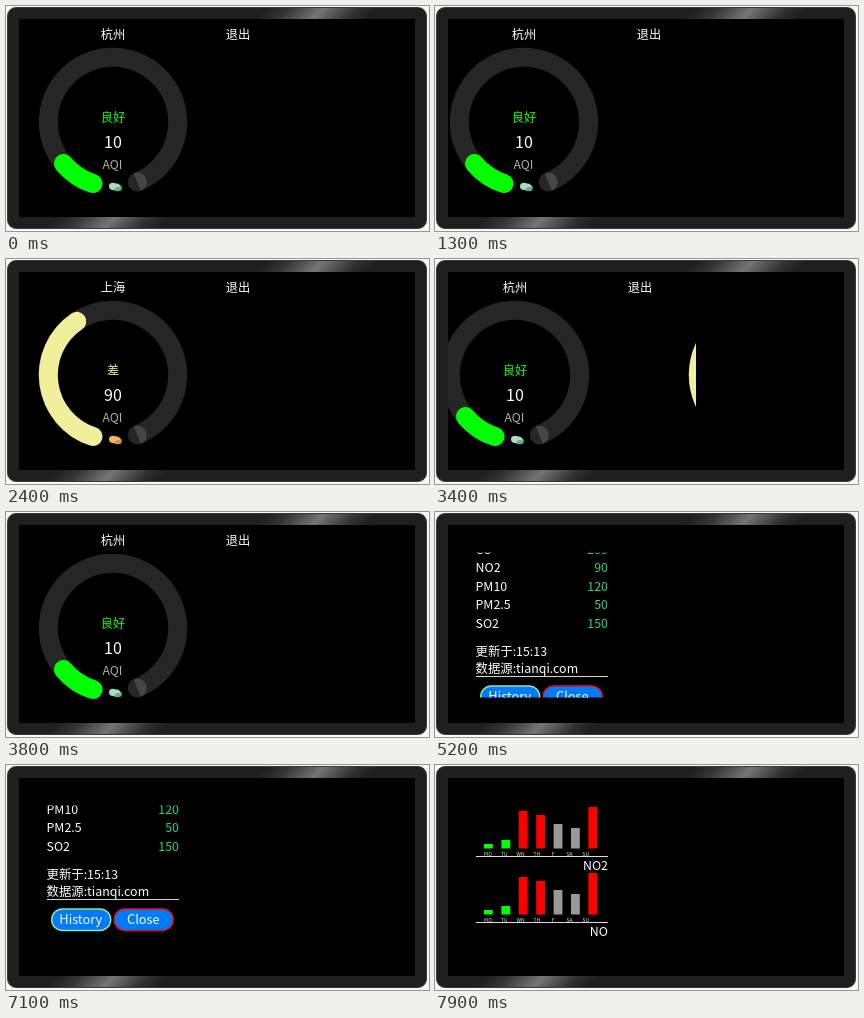
Recreate the animation shown at these times as an HTML page. Size 423 by 225 pixels, loop 8000 ms.

```html
<!DOCTYPE html>
<html lang="zh-CN">
<head>
<meta charset="utf-8">
<title>AQI</title>
<style>
html, body { margin: 0; width: 100%; height: 100%; overflow: hidden; background: #f8f8f8; }
.case {
  position: absolute; left: 1px; top: 1px; width: 418px; height: 220px;
  border: 1px solid #3a3a3a; border-radius: 9px;
  background: linear-gradient(135deg, #1f1f1f 40.5%, #343434 44%, #747474 49.5%, #303030 55%, #1f1f1f 58%);
}
svg { position: absolute; left: 0; top: 0; }
text { font-family: "Noto Sans CJK SC", "Noto Sans", sans-serif; font-size: 12.4px; fill: #fff; }
</style>
</head>
<body>
<div class="case"></div>
<svg id="stage" width="423" height="225" viewBox="0 0 423 225">
  <defs>
    <clipPath id="pageClip"><rect x="13" y="13" width="248" height="198"/></clipPath>
    <clipPath id="listClip"><rect x="40" y="40.5" width="134" height="145"/></clipPath>
  </defs>
  <rect x="13" y="13" width="396" height="198" fill="#000"/>
  <g id="pages" clip-path="url(#pageClip)"></g>
  <g id="panel" clip-path="url(#listClip)"><g id="list"></g></g>
  <g id="charts"></g>
</svg>
<script>
const LOOP = 8000, STEP = 100, PAGE = 248;
const CX = 107, CY = 116, R = 64.7, START = 18, SWEEP = 320;
const $ = id => document.getElementById(id);

function add(parent, tag, attrs, text) {
  const el = document.createElementNS('http://www.w3.org/2000/svg', tag);
  for (const k in attrs) el.setAttribute(k, attrs[k]);
  if (text !== undefined) el.textContent = text;
  parent.appendChild(el);
  return el;
}
// y is the visual middle of the line
function label(parent, str, x, y, { size = 12.4, fill = '#fff', anchor = 'start' } = {}) {
  return add(parent, 'text', {
    x, y: y + size * 0.365, 'text-anchor': anchor, style: `font-size:${size}px;fill:${fill}`
  }, str);
}
const mid = (parent, str, x, y, size, fill) => label(parent, str, x, y, { size, fill, anchor: 'middle' });

// Angles run clockwise from the bottom of the dial
function polar(deg) {
  const a = deg * Math.PI / 180;
  return [CX - R * Math.sin(a), CY + R * Math.cos(a)];
}
function arc(from, sweep) {
  const [x0, y0] = polar(from), [x1, y1] = polar(from + sweep);
  return `M${x0} ${y0}A${R} ${R} 0 ${sweep > 180 ? 1 : 0} 1 ${x1} ${y1}`;
}

function cloud(parent, light, dark) {
  const parts = [[111.5, 182, 4.4, 3.3, dark], [107, 180.3, 4, 3.6, light], [110.6, 180.4, 3.4, 3, light], [112, 183, 3, 2, dark]];
  for (const [cx, cy, rx, ry, fill] of parts) add(parent, 'ellipse', { cx, cy, rx, ry, fill });
}

function makePage({ city, level, value, color, icon }) {
  const g = add($('pages'), 'g', {});
  mid(g, city, CX, 29, 12.2);
  mid(g, '退出', 232, 29, 12.2);
  const track = { stroke: '#fff', 'stroke-opacity': 0.15, 'stroke-width': 19, fill: 'none' };
  add(g, 'path', { ...track, d: arc(START, SWEEP) });
  for (const a of [START, START + SWEEP]) {
    const [cx, cy] = polar(a);
    add(g, 'circle', { cx, cy, r: 9.5, fill: '#fff', 'fill-opacity': 0.15 });
  }
  const bar = add(g, 'path', { fill: 'none', stroke: color, 'stroke-width': 19, 'stroke-linecap': 'round' });
  mid(g, level, CX, 112, 12.2, color);
  mid(g, value, CX, 136.5, 16);
  mid(g, 'AQI', CX - 0.5, 159, 12.2, '#a5b5a5');
  cloud(g, ...icon);
  return {
    move: x => g.setAttribute('transform', `translate(${x})`),
    fill: f => {
      bar.style.display = f > 0 ? '' : 'none';
      bar.setAttribute('d', arc(START, Math.max(f, 0.001) * SWEEP * value / 100));
    }
  };
}
const first = makePage({ city: '杭州', level: '良好', value: 10, color: '#00ff00', icon: ['#a9dcc0', '#5fae8c'] });
const second = makePage({ city: '上海', level: '差', value: 90, color: '#f0f09c', icon: ['#f2b56a', '#d98b45'] });
first.fill(1);

function makeList() {
  const g = $('list');
  const rows = [['NO', 60], ['CO', 200], ['NO2', 90], ['PM10', 120], ['PM2.5', 50], ['SO2', 150]];
  rows.forEach(([name, n], i) => {
    const y = 19 + i * 18.45;
    label(g, name, 40.5, y);
    label(g, n, 173, y, { fill: '#2fd486', anchor: 'end' });
  });
  label(g, '更新于:15:13', 40.5, 139.5);
  label(g, '数据源:tianqi.com', 40.5, 156);
  add(g, 'rect', { x: 41, y: 164, width: 132, height: 1, fill: '#c8dcc8' });
  for (const [str, x, edge] of [['History', 45, '#8fe89a'], ['Close', 107.5, '#e81020']]) {
    add(g, 'rect', { x: x + 0.7, y: 173.9, width: 59, height: 21.6, rx: 10.8, fill: '#007bff', stroke: edge, 'stroke-width': 1.5 });
    mid(g, str, x + 29.8, 184.2, 12.8);
  }
}
makeList();

function makeChart(name, top) {
  const g = add($('charts'), 'g', { transform: `translate(0 ${top})` });
  const heights = [4.5, 8.5, 37.5, 33.5, 24.5, 20.5, 41.5];
  const colors = ['#00ff00', '#00ff00', '#ff0000', '#ff0000', '#999', '#999', '#ff0000'];
  heights.forEach((h, i) => add(g, 'rect', { x: 49 + i * 17.4, y: 43.5 - h, width: 8.8, height: h, fill: colors[i] }));
  ['MO', 'TU', 'WN', 'TH', 'F', 'SA', 'SU'].forEach((d, i) => mid(g, d, 53 + i * 16.3, 49.5, 5, '#ddd'));
  add(g, 'rect', { x: 41, y: 51, width: 132, height: 1, fill: '#ddd' });
  label(g, name, 173, 60.3, { anchor: 'end' });
}
makeChart('NO2', 40);
makeChart('NO', 106);

// Stepped values: [time, value]
const slide = [
  [0, 0], [1300, -18], [1400, -68], [1500, -136], [1600, -195], [1700, -221], [1800, -235], [1900, -243], [2000, -246.5], [2100, -248],
  [3100, -214], [3200, -132], [3300, -66], [3400, -27], [3500, -12], [3600, -5], [3700, -2], [3800, 0]
];
const scroll = [
  [0, -32], [5200, 0], [5300, 13], [5400, 20], [5500, 23], [6400, 37], [6500, 39],
  [7000, 34], [7100, 30], [7200, 27], [7300, 25], [7400, 24], [7500, 23]
];
function at(table, t) {
  let v = table[0][1];
  for (const [time, value] of table) if (t >= time) v = value;
  return v;
}
const show = (id, on) => { $(id).style.display = on ? '' : 'none'; };

function draw(now) {
  const t = Math.floor((now % LOOP) / STEP) * STEP;
  const x = at(slide, t);
  first.move(x);
  second.move(x + PAGE);
  second.fill(Math.min(1, Math.max(0, (t - 1920) / 1080)));
  $('list').setAttribute('transform', `translate(0 ${-at(scroll, t)})`);
  show('pages', t < 4400);
  show('panel', t >= 4400 && t < 7900);
  show('charts', t >= 7900);
}

const origin = performance.now();
function tick() {
  draw(performance.now() - origin);
  requestAnimationFrame(tick);
}
tick();
</script>
</body>
</html>
```
